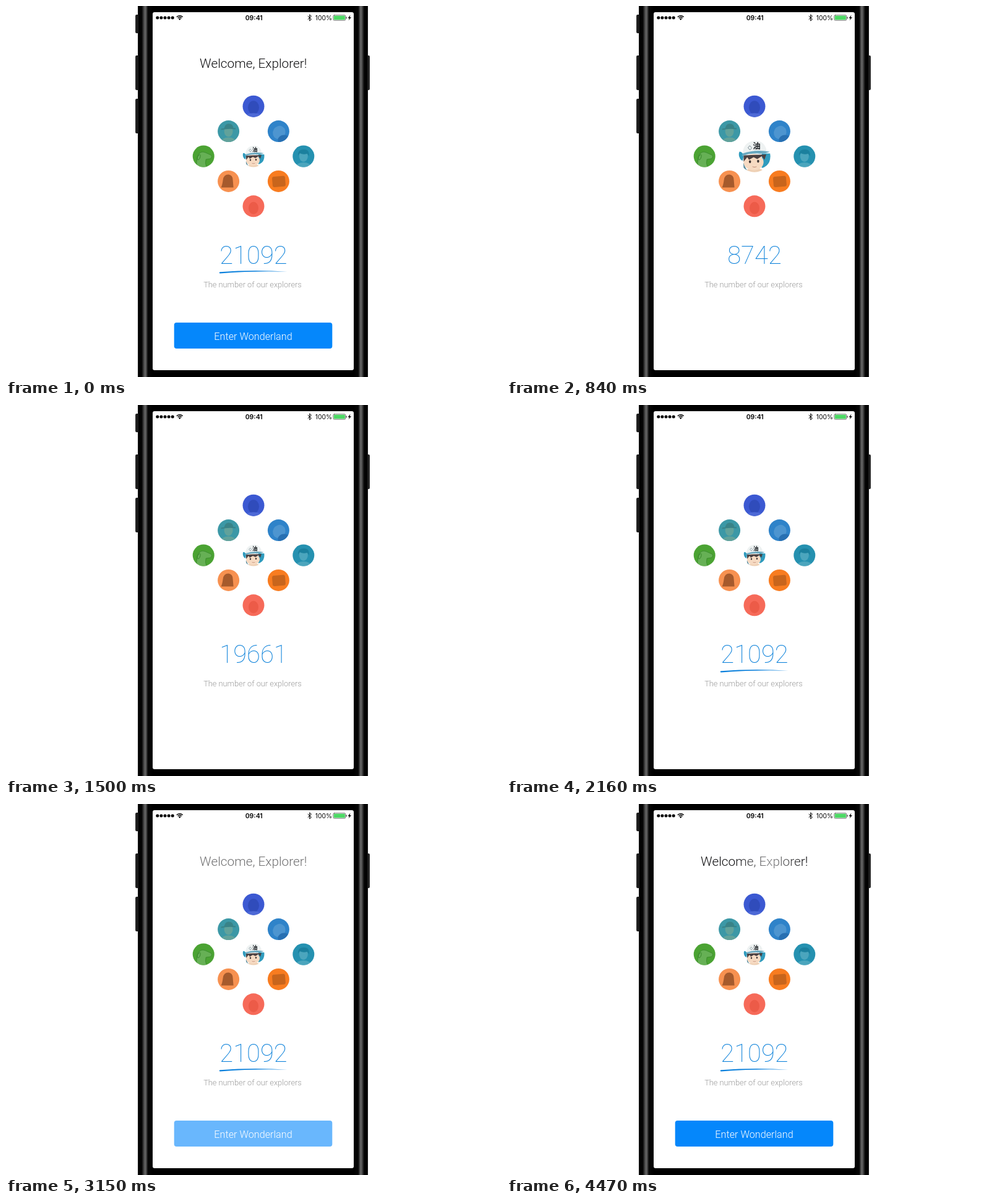
These frames come from a looping animation (800x600 px, 4500 ms). An HTML page with a canvas:

```html
<!DOCTYPE html>
<html lang="en">
<head>
<meta charset="utf-8">
<title>Welcome screen</title>
<style>
html, body { margin: 0; width: 100%; height: 100%; overflow: hidden; background: #fff; }
canvas { display: block; }
</style>
</head>
<body>
<canvas id="stage" width="800" height="600"></canvas>
<script>
const ctx = document.getElementById('stage').getContext('2d');
const LOOP = 4500, STEP = 30, TOTAL = 21092;
const COUNT_START = 311.6, COUNT_END = 1586.5;
const CX = 400, CY = 243, GAP = 40.4, R = 17.5;
const LIGHT = 'Roboto, "Liberation Sans", sans-serif';
const BLUE = '#0587fb';

const clamp = v => Math.max(0, Math.min(1, v));
const progress = (t, from, to) => clamp((t - from) / (to - from));
const easeInOut = p => p < .5 ? 2 * p * p : 1 - 2 * (1 - p) ** 2;
const easeOut = p => 1 - (1 - p) ** 3;

function box(x, y, w, h, r, fill) {
  ctx.fillStyle = fill;
  ctx.beginPath();
  ctx.roundRect(x, y, w, h, r);
  ctx.fill();
}

function oval(x, y, rx, ry, fill, angle = 0) {
  ctx.fillStyle = fill;
  ctx.beginPath();
  ctx.ellipse(x, y, rx, ry, angle, 0, Math.PI * 2);
  ctx.fill();
}

function shape(path, fill) {
  ctx.fillStyle = fill;
  ctx.fill(new Path2D(path));
}

function line(path, color, width) {
  ctx.strokeStyle = color;
  ctx.lineWidth = width;
  ctx.lineCap = ctx.lineJoin = 'round';
  ctx.stroke(new Path2D(path));
}

function label(text, x, y, font, fill) {
  ctx.font = font;
  ctx.fillStyle = fill;
  ctx.textAlign = 'center';
  ctx.fillText(text, x, y);
}

function layer(alpha, draw) {
  if (alpha <= 0) return;
  ctx.save();
  ctx.globalAlpha = alpha;
  draw();
  ctx.restore();
}

function disc(x, y, r, fill, draw) {
  ctx.save();
  ctx.translate(x, y);
  ctx.scale(r / R, r / R);
  oval(0, 0, R, R, fill);
  ctx.beginPath();
  ctx.arc(0, 0, R, 0, Math.PI * 2);
  ctx.clip();
  draw();
  ctx.restore();
}

function person(tone, hat) {
  oval(0, 0, 7, 9, tone);
  oval(0, 18, 13, 8, tone);
  if (hat) shape('M-12-4 Q0-7 12-5 L11-3 Q0-5-12-2Z M-7-5 Q-5-13 1-12 Q7-12 8-5Z', hat);
}

// Grid cell, disc colour and inner figure of each explorer
const explorers = [
  [0, -2, '#3c59d2', () => { oval(0, 2, 9, 11, '#304cbb'); oval(0, 17, 15, 6, '#4d69d6'); }],
  [-1, -1, '#3c98a6', () => person('#61a29b', '#398388')],
  [1, -1, '#2f83c9', () => { oval(1, 2, 10, 11, '#4d95d0', .5); oval(9, 14, 10, 8, '#2870b2'); }],
  [-2, 0, '#4ba333', () => {
    const dog = 'M-11 18 Q-12 2-8-3 Q-4-9 3-6 L12-2 Q15 1 11 4 L4 5 Q2 11 5 18Z';
    shape(dog, '#66b055');
    line(dog, '#37862a', .8);
    line('M-6-3 Q-12 1-9 6 Q-5 5-5-2', '#37862a', 1);
  }],
  [2, 0, '#2591b0', () => { person('#4ba5bd'); shape('M-9-1 Q-9-12 1-11 Q10-11 9 0 L6-4 Q-1-2-6-5Z', '#1b809e'); }],
  [-1, 1, '#f79150', () => shape('M-12 10 Q-10 6-9-2 Q-8-11 0-11 Q7-10 7-2 L8 10Z', '#a65a2c')],
  [1, 1, '#f87c20', () => { ctx.rotate(-.08); box(-10, -8, 21, 17, 3, '#c8651c'); }],
  [0, 2, '#f66a59', () => oval(0, 3, 8, 10, '#ec5b48')],
];

function hero(r) {
  disc(CX, CY, r, '#fff', () => {
    shape('M-18-5 Q-13-6-12 0 L-13 5 Q-17 4-18-5Z M8-3 L18-3 L18 4 Q14 12 8 13Z', '#2f9bbd');
    shape('M-12 7 Q-10 15-5 18 L-9 18 Q-13 14-12 7Z', '#5b8d9e');
    oval(0, 18, 11, 5, '#eed0b4');
    oval(-1, 6.5, 11, 9, '#f6dac2');
    shape('M-12-1 L13-2 L11 4 L8 0 L3 3 L-1 1 L-6 4 L-8 1 L-12 6Z', '#4b4142');
    oval(-5, 6, 1.2, 1.6, '#3b3333');
    oval(4, 5.5, 1.2, 1.6, '#3b3333');
    line('M-2 11.5 Q0 12.3 2 11.5', '#b98470', .7);
    shape('M-13-2 Q-13-15-1-17 Q10-18 13-8 L13-4 Q1-7-13-2Z', '#eef2f2');
    shape('M-13-3 Q1-8 17-5 Q10-2 3-3 Q-7-3-14 0Z', '#6aa9c0');
    line('M-5-11.5 l2 2.3 l-2 2.3 l-2-2.3Z', '#667880', .6);
    label('油', 2.3, -8, 'bold 8.5px "Noto Sans CJK SC", "Noto Sans CJK JP", sans-serif', '#1c2024');
  });
}

function acrossGradient(x0, x1, stops) {
  const g = ctx.createLinearGradient(x0, 0, x1, 0);
  stops.forEach(s => g.addColorStop(...s));
  return g;
}

const EDGE = [[0, '#222'], [.08, '#000'], [.27, '#060606'], [.4, '#444'], [.5, '#686868'],
  [.58, '#484848'], [.68, '#080808'], [1, '#000']];
const KEY = [[0, '#333'], [.4, '#161616'], [1, '#333']];

function phone() {
  ctx.fillStyle = '#fff';
  ctx.fillRect(0, 0, 800, 600);
  [[209, 14, 30], [209, 80, 56], [209, 150, 56], [581, 80, 56]].forEach(([x, y, h]) =>
    box(x, y, 7, h, 2, acrossGradient(x, x + 7, KEY)));
  ctx.fillStyle = '#000';
  ctx.fillRect(213, 0, 372, 600);
  ctx.fillStyle = acrossGradient(213, 237, EDGE);
  ctx.fillRect(213, 0, 24, 600);
  ctx.fillStyle = acrossGradient(585, 562, EDGE);
  ctx.fillRect(562, 0, 23, 600);
  box(237, 10, 325, 579, 3, '#fff');
}

function statusBar() {
  for (let i = 0; i < 5; i++) oval(244.8 + i * 6.1, 19, 2.5, 2.5, '#000');
  ctx.strokeStyle = '#000';
  ctx.lineWidth = 1.4;
  ctx.lineCap = 'butt';
  for (const r of [4.2, 6.8]) {
    ctx.beginPath();
    ctx.arc(280.7, 22.5, r, -Math.PI * .76, -Math.PI * .24);
    ctx.stroke();
  }
  shape('M280.7 23 L278.7 20.8 Q280.7 19.2 282.7 20.8Z', '#000');
  label('09:41', 400.7, 22.7, '600 10.5px Inter, sans-serif', '#000');
  label('100%', 513.4, 22.7, '400 10.3px Inter, sans-serif', '#000');
  line('M488 16.5 L493.5 21.5 L490.7 24 V14 L493.5 16.5 L488 21.5', '#000', 1);
  ctx.strokeStyle = '#333';
  ctx.lineWidth = .7;
  ctx.beginPath();
  ctx.roundRect(528.8, 14.8, 20, 8.4, 1.8);
  ctx.stroke();
  box(529.8, 15.8, 18, 6.4, 1, '#4cd964');
  box(549.5, 17.5, 1.2, 3, .6, '#333');
  shape('M556.5 14.5 L552.5 19.7 H555 L553.5 23.5 L558 18.2 H555.5Z', '#000');
}

// A pale highlight sweeps over the title once it has settled
function titleFill(t) {
  const ink = '#111113';
  if (t < 3600) return ink;
  const center = 425 + (t - 4470) * .2, half = 58;
  return acrossGradient(center - half, center + half, [[0, ink], [.5, '#88888a'], [1, ink]]);
}

function render(t) {
  const opening = t < STEP;
  const at = (from, to) => opening ? 1 : progress(t, from, to);

  phone();
  statusBar();

  const spread = easeOut(at(220, 700));
  if (spread > 0) {
    for (const [col, row, color, draw] of explorers) {
      disc(CX + col * GAP * spread, CY + row * GAP * spread, R * (.4 + .6 * spread), color, draw);
    }
  }
  layer(at(30, 180), () => hero(R + 37.5 * (1 - easeInOut(at(311, 1100)))));

  layer(at(60, 360), () => {
    const count = Math.round(TOTAL * at(COUNT_START, COUNT_END));
    label(count, 400, 416.5, '200 40px ' + LIGHT, '#0d82da');
    label('The number of our explorers', 398.5, 454.5, '300 12.8px ' + LIGHT, '#9c9c9c');
  });

  const drawn = easeInOut(at(1610, 2100));
  if (drawn > 0) {
    ctx.save();
    ctx.beginPath();
    ctx.rect(344, 420, 112 * drawn, 20);
    ctx.clip();
    shape('M345.5 430.2 Q402 425.8 454.5 429.8 Q402 428 346 432.6 Q343.5 432 345.5 430.2Z', '#0b80dc');
    ctx.restore();
  }

  const shown = at(2740, 3430);
  layer(shown, () => {
    label('Welcome, Explorer!', 399.8, 100, '300 20.8px ' + LIGHT, titleFill(t));
    box(271.7, 512, 255.6, 42, 4, BLUE);
  });
  if (shown > 0) label('Enter Wonderland', 399.5, 539.5, '300 16.2px ' + LIGHT, '#fff');
}

function tick(now) {
  const t = now % LOOP;
  render(Math.floor(t / STEP) * STEP);
  requestAnimationFrame(tick);
}
tick(performance.now());
</script>
</body>
</html>
```
